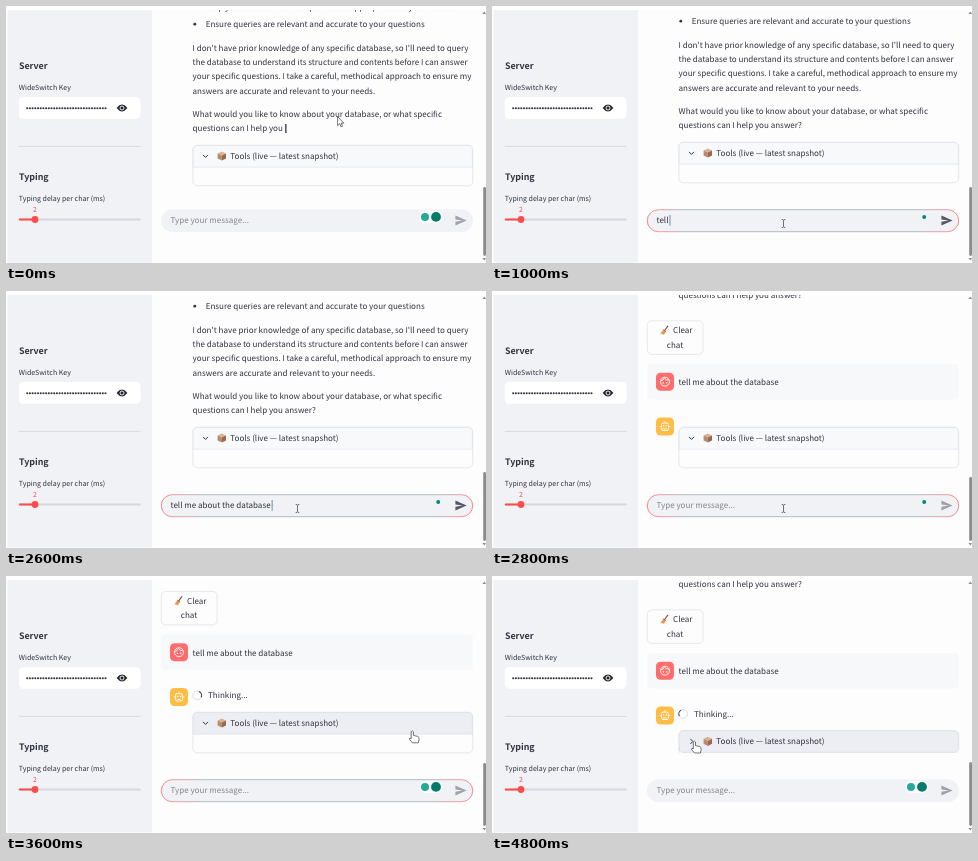
Write an HTML page that moves like this. It is 480 px wide and 257 px high and loops after 5 s.

```html
<!DOCTYPE html>
<html lang="en">
<head>
<meta charset="utf-8">
<title>Chat with a database</title>
<style>
  html, body { margin: 0; height: 100%; overflow: hidden; background: #fff; }
  svg { display: block; width: 100vw; height: 100vh; }
  text {
    font: 8.06px "Noto Sans CJK JP", "Noto Sans CJK SC", "Noto Sans CJK", "Open Sans", sans-serif;
    fill: #31333f; white-space: pre; text-rendering: geometricPrecision;
  }
  .head { font-size: 8.9px; font-weight: 700; }
  .label { font-size: 7.04px; }
  .hint { fill: #84868e; }
  .icon { fill: none; stroke: #fff; stroke-width: .9; }
  .line { fill: none; stroke: #31333f; stroke-width: 1; }
  .box { fill: #fdfdfe; stroke: #d6d8de; stroke-width: .6; }
  #cursors path { fill: #fff; stroke: #3a3a3e; stroke-width: .7; stroke-linejoin: round; }
</style>
</head>
<body>
<svg viewBox="0 0 480 257" preserveAspectRatio="none">
  <defs>
    <clipPath id="page"><rect y="4" width="480" height="253"/></clipPath>
    <linearGradient id="glow">
      <stop offset="0" stop-color="#f76565"/>
      <stop offset=".04" stop-color="#ee8585"/>
      <stop offset=".13" stop-color="#9fabb5"/>
      <stop offset=".87" stop-color="#9fabb5"/>
      <stop offset=".96" stop-color="#ee8585"/>
      <stop offset="1" stop-color="#f76565"/>
    </linearGradient>
  </defs>
  <rect x="1.5" y="4" width="478.5" height="253" fill="#fdfdfe"/>

  <!-- sidebar -->
  <rect x="1.5" y="4" width="144.5" height="252.5" fill="#f0f2f6"/>
  <text class="head" x="12.9" y="63">Server</text>
  <text class="label" x="12.8" y="84.2">WideSwitch Key</text>
  <rect x="12.8" y="91" width="121.7" height="21.7" rx="4.5" fill="#fff"/>
  <path d="M21.2 102.2H102.2" stroke="#31333f" stroke-width="2.1" stroke-linecap="round" stroke-dasharray="0 2.7"/>
  <path d="M110.6 102Q116 95.2 121.4 102Q116 108.8 110.6 102Z" fill="#22242e"/>
  <circle cx="116" cy="102" r="2" fill="#22242e" stroke="#fff" stroke-width=".9"/>
  <path d="M12.8 140.4H134.6" stroke="#d3d5da" stroke-width=".8"/>
  <text class="head" x="12.9" y="174.4">Typing</text>
  <text class="label" x="12.8" y="195.4">Typing delay per char (ms)</text>
  <text class="label" x="29" y="206.4" text-anchor="middle" style="fill:#ff4b4b">2</text>
  <rect x="12.8" y="212.6" width="122" height="1.9" rx=".9" fill="#d5d8df"/>
  <rect x="12.8" y="212.6" width="16" height="1.9" rx=".9" fill="#ff4b4b"/>
  <circle cx="29" cy="213.5" r="3.4" fill="#ff4b4b"/>

  <g clip-path="url(#page)">
    <g id="answer">
      <circle cx="188.8" cy="15.2" r="1.4" fill="#31333f"/>
      <text x="199.7" y="1.2">Help you understand what queries are appropriate for your needs</text>
      <text x="199.7" y="18">Ensure queries are relevant and accurate to your questions</text>
      <text x="186.6" y="41.5">I don't have prior knowledge of any specific database, so I'll need to query</text>
      <text x="186.6" y="55.8">the database to understand its structure and contents before I can answer</text>
      <text x="186.6" y="70.2">your specific questions. I take a careful, methodical approach to ensure my</text>
      <text x="186.6" y="84.5">answers are accurate and relevant to your needs.</text>
      <text x="186.6" y="107.9">What would you like to know about your database, or what specific</text>
      <text x="186.6" y="122.3" id="last"></text>
      <rect id="block" x="279.2" y="115" width="1.3" height="9" fill="#31333f"/>
    </g>

    <g id="chat">
      <rect class="box" x="155.3" y="15.3" width="55.8" height="33.6" rx="4.5"/>
      <path d="M176 20.4L172.6 25" stroke="#8d4a35" stroke-width="1.2"/>
      <path d="M171.6 24L174 25.8L172 29.2L168.4 28.3Z" fill="#e59a52"/>
      <path d="M171.4 24.2L173.8 26" stroke="#d9463e" stroke-width="1"/>
      <text x="181" y="27.6">Clear</text>
      <text x="183" y="42.2" text-anchor="middle">chat</text>

      <rect x="155" y="58.6" width="312" height="35.4" rx="4.5" fill="#f7f8fa"/>
      <rect x="164" y="67.2" width="18" height="18" rx="4.5" fill="#ff6c6c"/>
      <circle class="icon" cx="173" cy="76.2" r="4.5"/>
      <path class="icon" d="M168.8 75.4Q171.8 75 172.4 72.4Q174 75 177.2 74.6"/>
      <path d="M170.8 77.4h1.2M174 77.4h1.2" stroke="#fff" stroke-width="1.2"/>
      <text x="186.6" y="79.6">tell me about the database</text>

      <rect x="164" y="112" width="18" height="18" rx="4.5" fill="#ffbd45"/>
      <rect class="icon" x="169.6" y="117.6" width="6.8" height="7.4" rx="1.4"/>
      <path class="icon" d="M173 117.6V115.6M169.6 121H167.8M176.4 121H178.2M171.2 123.4H174.8"/>
      <path d="M171 120.4h1.2M173.8 120.4h1.2" stroke="#fff" stroke-width="1.2"/>

      <g id="thinking">
        <circle cx="191.2" cy="119.4" r="4.4" fill="none" stroke="#dcdde1" stroke-width="1"/>
        <path id="spinner" class="line" d="M194.3 116.3A4.4 4.4 0 0 1 194.3 122.5"/>
        <text x="202" y="122.4">Thinking...</text>
      </g>
    </g>

    <g id="tools">
      <rect id="panel" class="box" x="186.9" y="136.2" width="279.8" rx="4.5"/>
      <path id="header"/>
      <path id="chevron" class="line"/>
      <path d="M215.8 142.4L220 144.4L215.8 146.6L211.6 144.4Z" fill="#d9b296"/>
      <path d="M211.6 144.4L215.8 146.6V151.6L211.6 149.4Z" fill="#b98a6c"/>
      <path d="M220 144.4L215.8 146.6V151.6L220 149.4Z" fill="#98694f"/>
      <text x="224.3" y="150.1">Tools (live — latest snapshot)</text>
    </g>
  </g>

  <!-- message field -->
  <rect id="field" x="155.3" y="203.7" width="311.4" height="22" rx="11" fill="#f0f2f6" stroke-width=".8"/>
  <text id="message" x="164.5" y="217.3"></text>
  <rect id="caret" y="209" width=".8" height="10.6" fill="#4d7396"/>
  <g id="badges">
    <rect x="413.4" y="204.8" width="23" height="12.2" rx="6.1" fill="#fafbfd"/>
    <circle cx="419" cy="210.9" r="4" fill="#27a997"/>
    <circle cx="430" cy="210.9" r="4.9" fill="#047a69"/>
  </g>
  <circle id="dot" cx="432.2" cy="211" r="2" fill="#058a73"/>
  <path id="send" d="M449.4 209.6L460.6 214.6L449.4 219.6V215.7L456.6 214.6L449.4 213.5Z"/>

  <!-- scrollbar -->
  <rect id="thumb" x="477.2" width="2.8" rx="1.4" fill="#8b8b8b"/>
  <path d="M476.4 8L478.4 5.4L480 8ZM476.4 252L478.4 254.6L480 252Z" fill="#8b8b8b"/>

  <g id="cursors">
    <path id="arrow" d="M0 0V9L2.1 7.1L3.5 10.2L4.9 9.6L3.5 6.6H6.3Z"/>
    <path id="beam" d="M-1.8 -4Q0 -4 0 -3.4Q0 -4 1.8 -4M0 -3.4V3.4M-1.8 4Q0 4 0 3.4Q0 4 1.8 4"/>
    <path id="hand" d="M-1.1 1Q0 -.8 1.1 1V4.6L5.4 5.6Q7 6.2 6.8 8.4L6 12H.2L-3.2 8.2Q-2.8 6.6 -1.1 7.8Z"/>
  </g>
</svg>
<script>
const STEP = 200, LOOP = 5000;
const $ = id => document.getElementById(id);
const show = (id, on) => $(id).style.display = on ? '' : 'none';
const set = (id, attrs) => { for (const k in attrs) $(id).setAttribute(k, attrs[k]); };
const move = (id, x, y) => set(id, { transform: `translate(${x} ${y})` });

const prompt = 'tell me about the database';
// typed length at each step, starting at 1000 ms
const typed = [4, 4, 5, 6, 10, 11, 13, 18, 26];
// [first step, shape, x, y]
const pointer = [
  [0, 'arrow', 331.6, 110.6], [3, 'arrow', 308, 190], [4, 'beam', 291.5, 217.5],
  [15, 'hand', 396, 150], [16, 'hand', 406.3, 154.8], [21, 'hand', 310, 151],
  [22, 'hand', 202.4, 152], [23, 'hand', 202.4, 160], [24, 'hand', 202.4, 165]
];

function draw(n) {
  const sent = n >= 14, thinking = n >= 15, folded = n >= 23;
  const shift = folded ? 18.5 : thinking ? 0 : 14.5;
  const focused = n >= 4 && !folded;

  $('last').textContent = 'questions can I help you' + (n ? ' answer?' : '');
  show('block', n === 0);
  move('answer', 0, sent ? shift - 129.3 : n ? 0 : 3);

  show('chat', sent);
  move('chat', 0, shift);
  show('thinking', thinking);
  set('spinner', { transform: `rotate(${(n - 18) * 96 - 20} 191.2 119.4)` });

  move('tools', 0, folded ? 18.3 : n ? 0 : 3);
  set('panel', { height: folded ? 22 : 40.6 });
  set('header', {
    d: 'M187.2 158.2V140.7Q187.2 136.5 191.4 136.5H462.2Q466.4 136.5 466.4 140.7' +
       (folded ? 'V153.7Q466.4 157.9 462.2 157.9H191.4Q187.2 157.9 187.2 153.7Z' : 'V158.2Z'),
    fill: thinking ? '#eceef3' : '#f8f9fb', stroke: '#d6d8de', 'stroke-width': .5
  });
  set('chevron', { d: folded ? 'M198.4 144.6L200.9 147.1L198.4 149.6' : 'M197 145.9L199.5 148.4L202 145.9' });

  const count = typed[n - 5] || 0, message = $('message');
  message.textContent = count ? prompt.slice(0, count) : 'Type your message...';
  message.setAttribute('class', count ? '' : 'hint');
  show('caret', count);
  if (count) set('caret', { x: 165.6 + message.getComputedTextLength() });
  set('field', { stroke: focused ? 'url(#glow)' : '#f0f2f6' });
  set('send', { fill: count ? '#555863' : '#a0a2aa' });

  const quiet = n >= 4 && n < 16;
  show('badges', !quiet);
  show('dot', quiet);

  const top = !sent ? 181 : thinking && !folded ? 187 : 186;
  set('thumb', { y: top, height: 250 - top });

  const [, shape, x, y] = pointer.findLast(p => p[0] <= n);
  for (const id of ['arrow', 'beam', 'hand']) show(id, id === shape);
  move(shape, x, y);
}

let last = -1;
function tick() {
  const n = Math.floor(performance.now() % LOOP / STEP);
  if (n !== last) draw(last = n);
  requestAnimationFrame(tick);
}
tick();
</script>
</body>
</html>
```
